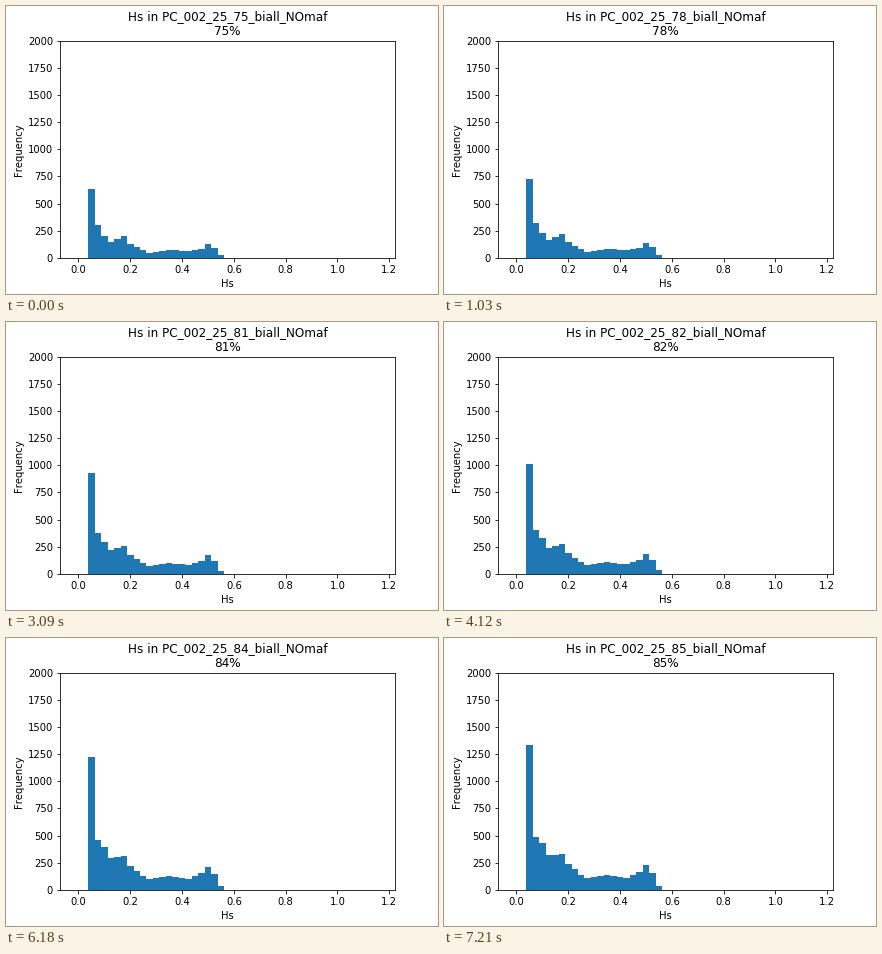
A matplotlib script that plays this animation: 432x288 px, repeating every 8000 ms.

```python
import numpy as np
import matplotlib.pyplot as plt
from matplotlib.animation import FuncAnimation

LOOP, STEP, HOLD = 8000, 40, 1030
BIN, FIRST, BARS = 0.025, 2, 21
PERCENTS = [75, 78, *range(80, 86)]

# Key points of the outline: bar index, count at 75 %, count at 85 %.
OUTLINE = [(0, 632, 1335), (1, 302, 488), (2, 200, 433), (3, 146, 322),
           (5, 200, 331), (6, 129, 240), (8, 74, 138), (9, 50, 111),
           (12, 74, 138), (15, 65, 111), (17, 83, 166), (18, 129, 230),
           (19, 92, 157), (20, 26, 40)]


def counts_at(percent):
    """Ease the outline from its first shape to its last."""
    where, low, high = np.array(OUTLINE).T
    growth = ((percent - 75) / 10) ** 1.7
    return np.interp(range(BARS), where, low + growth * (high - low))


plt.rcParams["font.family"] = "DejaVu Sans"
plt.rcParams["text.kerning_factor"] = 6
fig, ax = plt.subplots(figsize=(6, 4), dpi=72)
fig.subplots_adjust(left=0.125, right=0.9, bottom=0.125, top=0.88)

edges = np.arange(0, 1.2, BIN) - BIN / 2
margin = 0.05 * (edges[-1] - edges[0])
bars = ax.bar(edges[FIRST:FIRST + BARS], counts_at(PERCENTS[0]), BIN,
              align="edge", color="#1f77b4")
ax.set_xlim(edges[0] - margin, edges[-1] + margin)
ax.set_ylim(0, 2000)
ax.set_xlabel("Hs")
ax.set_ylabel("Frequency")
title = ax.set_title("")


def update(i):
    # Look ahead within the step so a change is never late.
    state = min((i * STEP + 30) // HOLD, len(PERCENTS) - 1)
    percent = PERCENTS[state]
    for bar, height in zip(bars, counts_at(percent)):
        bar.set_height(height)
    title.set_text(f"Hs in PC_002_25_{percent}_biall_NOmaf\n{percent}%")
    return [title, *bars]


anim = FuncAnimation(fig, update, frames=LOOP // STEP, interval=STEP,
                     init_func=lambda: update(0), repeat=True, repeat_delay=0)
plt.show()
```
